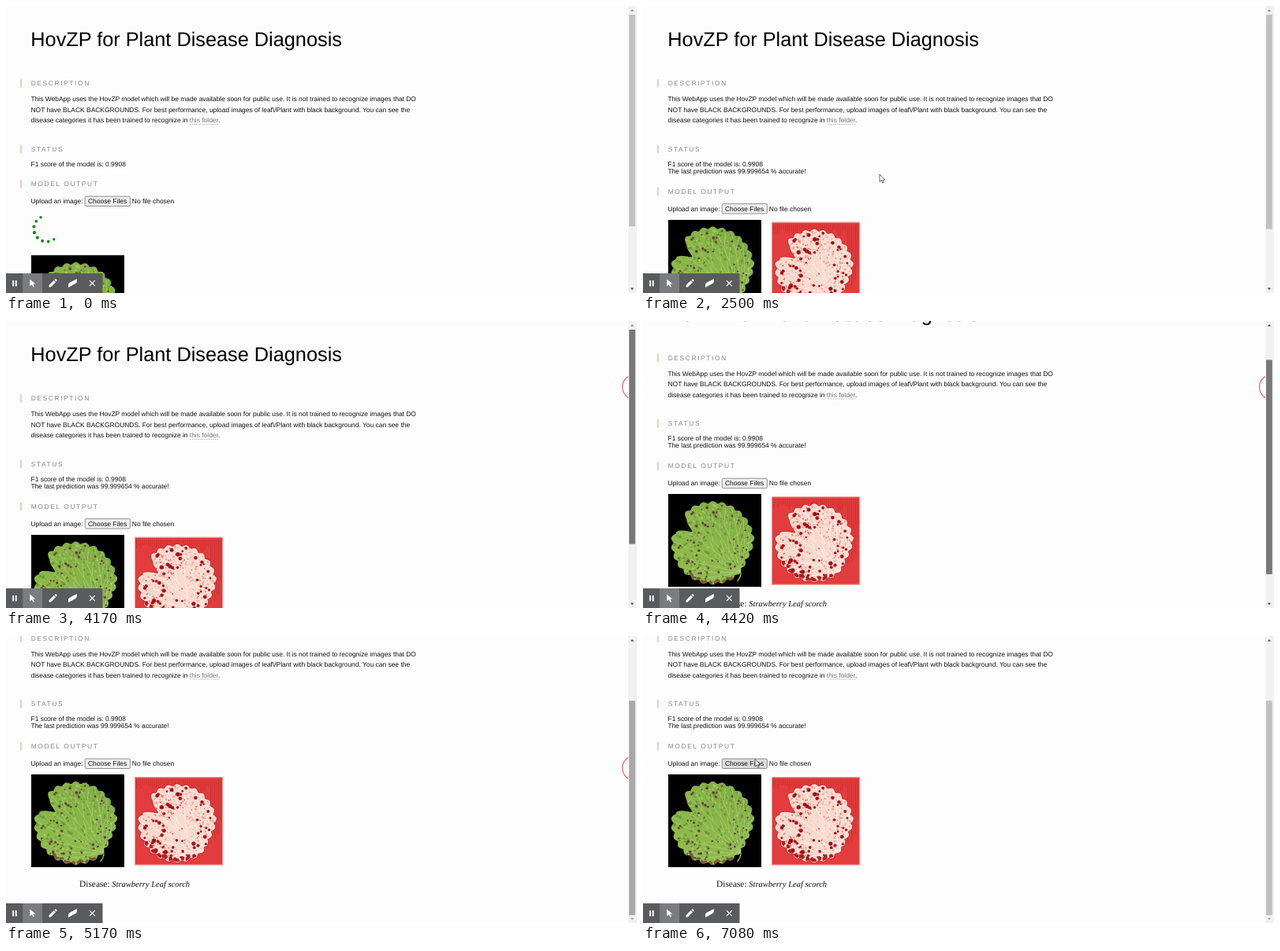
These frames come from a looping animation (800 px wide and 365 px high, 8 s). An HTML page:

```html
<!DOCTYPE html>
<html lang="en">
<head>
<meta charset="utf-8">
<title>Plant diagnosis</title>
<style>
html, body { margin: 0; width: 100%; height: 100%; overflow: hidden; background: #fefdfe; }
svg { display: block; width: 800px; height: 365px; }
text { font-family: "Liberation Sans", Arial, sans-serif; font-size: 8.43px; fill: #111; text-rendering: geometricPrecision; white-space: pre; }
.title { font-size: 25.3px; fill: #000; }
.head { fill: #85858a; letter-spacing: 1.6px; }
.link { fill: #777; }
.serif { font-family: "Liberation Serif", "Times New Roman", serif; font-size: 11.4px; }
.serif.it { font-size: 10.5px; font-style: italic; }
</style>
</head>
<body>
<svg id="stage" viewBox="0 0 800 365"></svg>
<script>
const LOOP = 8000, FRAME = 1000 / 12, READY = 1000, MAX_SCROLL = 95.5;
const BAR_TOP = 11, BAR_LENGTH = 344, VIEW = 365;
const stage = document.getElementById("stage");

// ---- drawing helpers ----
function seeded(seed) {
  return () => (seed = (seed * 16807) % 2147483647) / 2147483647;
}
const repeat = (n, make) => Array.from({ length: n }, (_, i) => make(i)).join("");
const text = (x, y, s, cls = "") => `<text x="${x}" y="${y}" class="${cls}">${s}</text>`;
const rect = (x, y, w, h, fill, more = "") =>
  `<rect x="${x}" y="${y}" width="${w}" height="${h}" fill="${fill}" ${more}/>`;
const dot = (x, y, r, fill) =>
  `<circle cx="${x.toFixed(1)}" cy="${y.toFixed(1)}" r="${r.toFixed(2)}" fill="${fill}"/>`;
const line = (d, color, width, more = "") =>
  `<path d="${d}" fill="none" stroke="${color}" stroke-width="${width}" ${more}/>`;
const heading = (y, s) => rect(18.3, y - 8, 1.3, 10.5, "#e2b596") + text(31.7, y, s, "head");

// ---- leaf: a scalloped disc with a deep notch at the upper left ----
const bump = (deg, at, width) => Math.exp(-(((deg - at) / width) ** 2));

function rim(deg, k = 1) {
  const scallop = 3.6 * Math.abs(Math.sin(deg * 13 * Math.PI / 180)) - 1.5;
  const r = k * (51 + scallop - 21 * bump(deg, 210, 10) - 4 * bump(deg, 25, 20));
  const a = deg * Math.PI / 180;
  return [57 + r * Math.cos(a), 62 + r * Math.sin(a)];
}

function arc(from, to, k = 1) {
  let d = "";
  for (let deg = from; deg <= to; deg += 2) {
    d += (d ? "L" : "M") + rim(deg, k).map(v => v.toFixed(1));
  }
  return d;
}
const outline = arc(0, 358) + "Z";

// Veins fan out from the stem, each with a pair of side branches.
function veins(color, width) {
  let d = "";
  for (let deg = 110; deg <= 345; deg += 23.5) {
    const [x, y] = rim(deg, 0.95), dx = x - 92, dy = y - 99;
    d += `M92 99q${dx / 2 + 6} ${dy / 2 + 2} ${dx} ${dy}`;
    for (const k of [0.35, 0.55, 0.75]) {
      d += `M${92 + dx * k + 3} ${99 + dy * k}l${dx * 0.15 + 6} ${dy * 0.2}`;
    }
  }
  return line(d, color, width);
}

function scatter(count, seed, paint) {
  const rnd = seeded(seed);
  return repeat(count, () => {
    const [x, y] = rim(rnd() * 360, 0.15 + 0.8 * Math.sqrt(rnd()));
    return paint(x, y, rnd());
  });
}
const speckle = (count, seed, fill, size) =>
  scatter(count, seed, (x, y, k) => dot(x, y, size * (0.5 + k), fill));
const spots = (color, core, grow) => scatter(62, 4127, (x, y, k) => {
  const r = (0.9 + k * 1.3) * grow;
  return dot(x, y, r, color) + dot(x + 0.3, y + 0.2, r * 0.5, core);
});

function photo() {
  return rect(0, 0, 118.3, 118, "#000", 'shape-rendering="crispEdges"') +
    line("M92 98q2 6-4 13", "#9cb95a", 1.4) +
    `<path d="${outline}" fill="url(#green)"/><g clip-path="url(#leafClip)">` +
    speckle(150, 77, "#6f9a37", 1.4) + speckle(90, 311, "#a3c963", 1) +
    veins("#b4d27c", 0.7) +
    line(arc(60, 130, 0.97), "#7d5a3b", 4, 'stroke-dasharray="9 2 5 3"') +
    spots("#785a44", "#4b2f37", 0.95) + "</g>";
}

function heatmap() {
  const rnd = seeded(903);
  const streaks = repeat(44, i => {
    const x = 3 + i * 2.6, reach = x > 100 ? 105 : 14 + 10 * rnd();
    return `M${x} 3v${reach * (0.4 + 0.6 * rnd())}`;
  });
  return rect(0, 0, 118, 118, "#e33c3c") + line(streaks, "#b32327", 0.7, 'opacity=".65"') +
    `<path d="${outline}" fill="#f8d9ce" stroke="#b91f25" stroke-width=".9"/><g clip-path="url(#leafClip)">` +
    speckle(190, 51, "#f0a090", 1) + speckle(110, 619, "#dd5a52", 0.8) +
    veins("#fff2ea", 0.8) +
    line(arc(60, 150, 0.93), "#b51c23", 4.5, 'stroke-dasharray="5 3 8 2"') +
    spots("#b5161f", "#8e0a14", 1.35) + "</g>" +
    rect(0.4, 0.4, 117.2, 117.2, "none", 'stroke="#efc0b4" stroke-width=".9"');
}

// ---- page and tools ----
function spinner() {
  return repeat(8, i => {
    const a = (56 + i * 26.6) * Math.PI / 180;
    return dot(16.4 * Math.cos(a), 16.4 * Math.sin(a), 1.75 + 0.4 * Math.sin(i / 7 * Math.PI), "#1c8a1c");
  });
}

function page() {
  const about = [
    "This WebApp uses the HovZP model which will be made available soon for public use. It is not trained to recognize images that DO",
    "NOT have BLACK BACKGROUNDS. For best performance, upload images of leaf\\/Plant with black background. You can see the",
    'disease categories it has been trained to recognize in <tspan class="link">this folder</tspan>.'];
  return text(31.3, 51, "HovZP for Plant Disease Diagnosis", "title") +
    heading(101.2, "DESCRIPTION") +
    about.map((s, i) => text(31.5, 121 + i * 13.5, s)).join("") +
    line("M233 150.4H270", "#999", 0.7, 'stroke-dasharray="1 .6"') +
    heading(184.6, "STATUS") +
    text(31.5, 203.5, "F1 score of the model is: 0.9908") +
    `<g id="result">${text(31.5, 212.8, "The last prediction was 99.999654 % accurate!")}
      <g transform="translate(163 274.8) scale(.95)">${heatmap()}</g>
      ${text(93, 414, "Disease:", "serif")}${text(134.3, 414, "Strawberry Leaf scorch", "serif it")}</g>
    <g id="form">${heading(238.6, "MODEL OUTPUT")}${text(31.5, 260.8, "Upload an image:")}
      ${rect(100.2, 251.6, 57.2, 12.4, "#efefef", 'id="button" rx="1.6" stroke="#767676" stroke-width=".8"')}
      ${text(104, 260.8, "Choose Files")}${text(159.8, 260.8, "No file chosen")}</g>
    <g id="spinner">${spinner()}</g><g id="leaf">${photo()}</g>`;
}

function toolbar() {
  const pause = rect(8.2, 349, 1.9, 7.4, "#fff") + rect(11.8, 349, 1.9, 7.4, "#fff");
  const arrow = '<path d="M30.3 347.6l7 6h-3l1.8 3.4-1.5.8-1.7-3.5-2.6 2z"/>';
  const pen = '<path d="M54.5 357.6v-2.4l6.2-6.2 2.3 2.3-6.2 6.3zM61.4 348.3l1.6-1.3 2 2-1.3 1.6z"/>';
  const eraser = '<path d="M79 354l1-1.8 9.8-5.2v3.8l-.8 1.6-10 5.6z"/>';
  return rect(0, 340, 122.5, 25, "#5a5b5e") + rect(21.2, 340, 24.8, 25, "#7b7c7f") +
    `<g fill="#fff">${pause}${arrow}${pen}${eraser}</g>` +
    line("M105.9 349.2l6.8 6.8m0-6.8l-6.8 6.8", "#fff", 1.1);
}

function scrollbar() {
  return rect(789, 0, 11, VIEW, "#f1f1f1") + rect(790, BAR_TOP, 7.8, 0, "#c1c1c1", 'id="thumb"') +
    '<path id="up" d="M791.6 6.8l2.3-2.6 2.3 2.6z"/><path id="down" d="M791.6 358.6l2.3 2.6 2.3-2.6z"/>';
}

stage.innerHTML = `<defs>
  <linearGradient id="green" x1="1" y1="0" x2="0" y2="1"><stop offset="0" stop-color="#7fab42"/><stop offset="1" stop-color="#92c04e"/></linearGradient>
  <clipPath id="leafClip"><path d="${outline}"/></clipPath>
  <clipPath id="view"><rect width="789" height="365"/></clipPath></defs>
  ${rect(0, 0, 800, VIEW, "#fefdfe")}
  <g id="page">${page()}</g>${toolbar()}
  <g clip-path="url(#view)">
    <circle id="ring" cx="797.3" r="15.8" fill="none" stroke="#ee6c66" stroke-width="1.3"/>
    <path id="cursor" d="M0 0v9.6l2.2-2 1.5 3.4 1.5-.6-1.5-3.3h3z" fill="#fff" stroke="#333" stroke-width=".75"/>
  </g>${scrollbar()}`;

const el = {};
stage.querySelectorAll("[id]").forEach(n => el[n.id] = n);
const set = (id, name, value) => el[id].setAttribute(name, value);
const move = (id, x, y, more = "") => set(id, "transform", `translate(${x} ${y}) ${more}`);
const show = (id, on) => set(id, "visibility", on ? "visible" : "hidden");

// ---- motion ----
const progress = (t, from, to) => Math.min(1, Math.max(0, (t - from) / (to - from)));
const smooth = u => u * u * (3 - 2 * u);
const easeOut = u => 1 - (1 - u) ** 2;

const glides = [
  { from: 2840, to: 3330, x: 449, y: 163 },
  { from: 3420, to: 3660, x: 797, y: 84 },
  { from: 4170, to: 4940, x: 797, y: 168 },
  { from: 5660, to: 6330, x: 404, y: 212 },
  { from: 6670, to: 7080, x: 142, y: 156.5 }];

function pointer(t) {
  let x = 300, y = 214;
  for (const g of glides) {
    const u = smooth(progress(t, g.from, g.to));
    x += (g.x - x) * u;
    y += (g.y - y) * u;
  }
  return [x, y];
}

function thumbColor(t) {
  if (t >= 4000 && t < 5080) return "#787878";
  return t >= 3660 && t < 5750 ? "#a8a8a8" : "#c1c1c1";
}

function draw(ms) {
  const t = Math.floor((ms + 7) / FRAME) * FRAME + 0.01;
  const ready = t >= READY;
  const scroll = MAX_SCROLL * easeOut(progress(t, 4170, 4940));
  const scale = BAR_LENGTH / (VIEW + MAX_SCROLL + (ready ? 0 : 6));

  move("page", 0, -scroll);
  move("form", 0, ready ? 0 : -9.5);
  move("leaf", 31.5, ready ? 271.5 : 316.8);
  show("result", ready);
  show("spinner", !ready);
  move("spinner", 51.6, 283.2, `rotate(${Math.min(t, 667) * 0.3})`);

  show("cursor", t >= 2500);
  move("cursor", ...pointer(t));
  set("button", "fill", t >= 7080 ? "#dcdcde" : "#efefef");
  show("ring", t >= 4000 && t < 5410);
  set("ring", "cy", 84 + 84 * easeOut(progress(t, 4590, 5160)));

  set("thumb", "y", BAR_TOP + scroll * scale);
  set("thumb", "height", VIEW * scale);
  set("thumb", "fill", thumbColor(t));
  set("up", "fill", scroll > 0 ? "#505050" : "#8a8a8a");
  set("down", "fill", scroll < MAX_SCROLL ? "#505050" : "#a3a3a3");
}

const start = performance.now();
function tick() {
  draw((performance.now() - start) % LOOP);
  requestAnimationFrame(tick);
}
tick();
</script>
</body>
</html>
```
